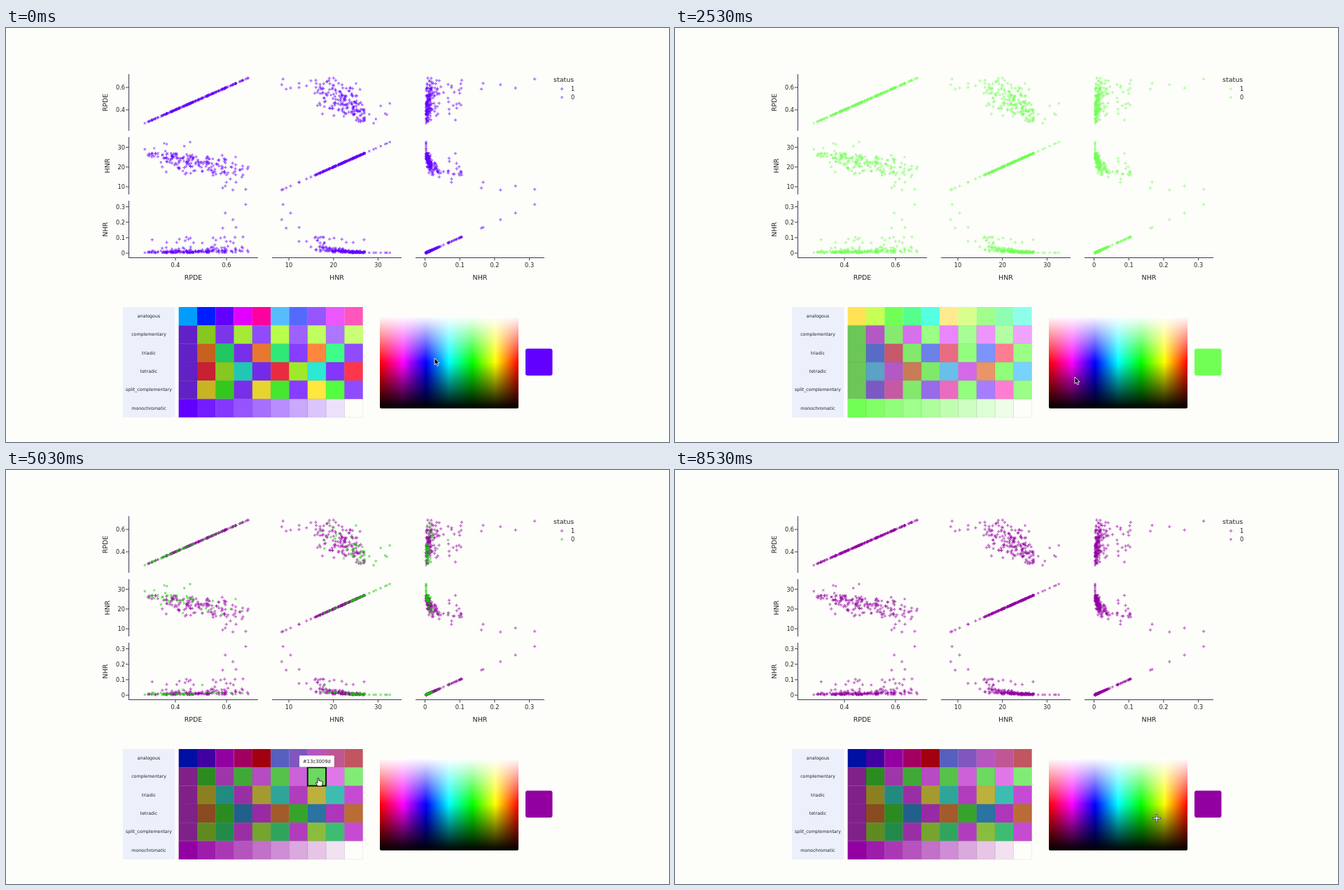
Write an HTML page that moves like this. It is 947 px wide and 592 px high and loops after 8.56 s.

```html
<!DOCTYPE html>
<html lang="en">
<head>
<meta charset="utf-8">
<title>Scatter matrix with colour harmonies</title>
<style>
  html, body { margin: 0; width: 100%; height: 100%; overflow: hidden; background: #fdfdfa; }
  #stage { position: relative; width: 947px; height: 592px; }
  #picker {
    position: absolute; left: 533.5px; top: 411.5px; width: 198px; height: 132.5px; border-radius: 2px;
    background: linear-gradient(#fff, #fff0 50%, #0000 50%, #000),
      linear-gradient(90deg, red, #f0f, blue, cyan, lime, yellow, red);
  }
  svg { position: absolute; left: 0; top: 0; font-family: "DejaVu Sans", Verdana, sans-serif; fill: #222; }
</style>
</head>
<body>
<div id="stage">
  <div id="picker"></div>
  <svg id="svg" width="947" height="592" viewBox="0 0 947 592"></svg>
</div>
<script>
const LOOP = 8560;
const svg = document.getElementById('svg');

function add(tag, attrs, parent = svg, text) {
  const el = document.createElementNS('http://www.w3.org/2000/svg', tag);
  for (const key in attrs) el.setAttribute(key, attrs[key]);
  if (text !== undefined) el.textContent = text;
  parent.append(el);
  return el;
}
const label = (text, x, y, size, anchor = 'middle', extra = {}) =>
  add('text', { x, y, 'font-size': size, 'text-anchor': anchor, ...extra }, svg, text);
const line = d => add('path', { d, stroke: '#3c3c58', 'stroke-width': 1, fill: 'none' });
const clamp = (v, lo, hi) => Math.max(lo, Math.min(hi, v));

// Seeded random numbers
let seed = 20;
function rand() {
  seed = (seed + 0x6D2B79F5) | 0;
  let n = Math.imul(seed ^ (seed >>> 15), 1 | seed);
  n = (n + Math.imul(n ^ (n >>> 7), 61 | n)) ^ n;
  return ((n ^ (n >>> 14)) >>> 0) / 4294967296;
}
const between = (lo, hi) => lo + (hi - lo) * rand();
const gauss = () => (rand() + rand() + rand() + rand() - 2) * 1.73;

// One sample: [RPDE, HNR, NHR, status]
function sample(i) {
  const status = i % 4 ? 1 : 0;
  if (i % 24 === 0) return [between(.26, .46), between(27.5, 33), .003, status];
  let rpde;
  do rpde = status ? .52 + gauss() * .11 : .45 + gauss() * .09; while (rpde < .29 || rpde > .685);
  const noisy = i % 14 === 5;
  let hnr = 25.3 - (rpde - .35) * 22 + gauss() * 2.8 + (status ? 0 : 1.6) - (noisy ? 3 : 0);
  if (hnr > 27) hnr = between(24.5, 27);
  if (hnr < 12) hnr = between(12, 15);
  return [rpde, hnr, noisy ? between(.06, .115) : .85 * Math.exp(-hnr / 5.2 + gauss() * .4), status];
}
const samples = [[.675, 8.7, .315, 1], [.595, 10.4, .26, 1], [.625, 8.4, .217, 1], [.637, 12.3, .167, 1],
  [.585, 9.4, .162, 1]];
for (let i = 1; i <= 190; i++) samples.push(sample(i));

// Each variable: value -> x and y, ticks, axis ends
const vars = [
  { name: 'RPDE', x: v => 242 + (v - .4) * 365, y: v => 117 - (v - .4) * 160,
    ticks: [.4, .6], xs: [175, 360], ys: [66, 147], titleX: 145 },
  { name: 'HNR', x: v => 404 + (v - 10) * 6.37, y: v => 227 - (v - 10) * 2.82,
    ticks: [10, 20, 30], xs: [380, 565], ys: [156, 238], titleX: 148 },
  { name: 'NHR', x: v => 598.5 + v * 497, y: v => 322 - v * 221,
    ticks: [0, .1, .2, .3], xs: [585, 769], ys: [247, 329], titleX: 145 }
];
for (const v of vars) {
  const midX = (v.xs[0] + v.xs[1]) / 2, midY = (v.ys[0] + v.ys[1]) / 2;
  line(`M${v.xs[0]} 328.5H${v.xs[1]}M175.5 ${v.ys[0]}V${v.ys[1]}`);
  label(v.name, midX, 359.5, 9.5);
  label(v.name, 0, 0, 9.5, 'middle', { transform: `translate(${v.titleX} ${midY})rotate(-90)` });
  for (const tick of v.ticks) {
    line(`M${v.x(tick)} 329v3.5M175 ${v.y(tick)}h-4`);
    label(tick, v.x(tick), 342, 8.2);
    label(tick, 170, v.y(tick) + 3, 8.2, 'end');
  }
}

// Markers: group 1 plus signs, group 0 crosses
const shapes = ['m-1.4 -1.4l2.8 2.8m0 -2.8l-2.8 2.8', 'm-2.2 0h4.4m-2.2 -2.2v4.4'];
const groups = [1, 0].map(() => add('g', { 'stroke-width': 1.25, 'stroke-opacity': .58, fill: 'none' })).reverse();
const marker = (x, y, status) =>
  add('path', { d: `M${x.toFixed(1)} ${y.toFixed(1)}${shapes[status]}` }, groups[status]);
for (const s of samples)
  vars.forEach((h, i) => vars.forEach((v, j) => marker(h.x(s[i]), v.y(s[j]), s[3])));

label('status', 782, 77, 9.5, 'start');
[1, 0].forEach((status, i) => {
  marker(794, 87 + i * 12.2, status);
  label(status, 807, 90 + i * 12.2, 8.2, 'start');
});

// Harmony table
const SIZE = 26.3, LEFT = 246.7, TOP = 399;
const harmonies = ['analogous', 'complementary', 'triadic', 'tetradic', 'split_complementary', 'monochromatic'];
const turns = [null, [0, 180], [0, 120, 240], [0, 90, 180, 270], [0, 150, 210]];
add('rect', { x: 167, y: TOP, width: 74.5, height: SIZE * 6, fill: '#ebf0fb' });
const cells = harmonies.map((name, row) => {
  label(name, 204, TOP + (row + .5) * SIZE + 2, 6.3);
  return Array.from({ length: 10 }, (_, col) => add('rect', {
    x: LEFT + col * SIZE, y: TOP + row * SIZE, width: SIZE, height: SIZE,
    stroke: '#000', 'stroke-opacity': row ? .08 : 0, 'stroke-width': .7
  }));
});

function rgb(h, s, v) {
  return [5, 3, 1].map(n => {
    const k = (n + h / 60 + 6) % 6;
    return Math.round(255 * (v - v * s * clamp(Math.min(k, 4 - k), 0, 1)));
  });
}
const hex = parts => '#' + parts.map(p => p.toString(16).padStart(2, '0')).join('');

function cellColor([h, s, v], row, col) {
  if (row === 0) return { color: rgb(h + (col % 5 - 2) * 30, s, v), alpha: col < 5 ? 1 : .66 };
  if (row === 5) return { color: rgb(h, s, v), alpha: 1 - col / 9 };
  const turn = turns[row], step = Math.floor(col / turn.length);
  return {
    color: rgb(h + turn[col % turn.length], s, Math.min(1, v * (.75 + .15 * step))),
    alpha: .87 - .17 * step / turn.length
  };
}

// Pointer way points: time, x, y
const path = [
  [-150, 587, 478], [0, 612, 472], [700, 671, 456], [1200, 671, 456], [1470, 671, 448], [1830, 671, 456],
  [2530, 571, 499], [2900, 570, 502], [3600, 478, 467], [4300, 446, 440], [5030, 446, 440],
  [7000, 443, 508], [7600, 443, 510], [8200, 712, 520], [8530, 688, 498], [LOOP, 688, 498]
];
function pointerAt(t) {
  const i = path.findIndex(p => p[0] > t);
  const [t0, x0, y0] = path[i - 1], [t1, x1, y1] = path[i], u = (t - t0) / (t1 - t0);
  return [x0 + (x1 - x0) * u, y0 + (y1 - y0) * u];
}

// While dragging, the colour under the pointer is taken at a fixed beat, a little late
const DRAG_END = 2900, BEAT = 660, LAG = 150;
function baseAt(t) {
  const [x, y] = pointerAt(Math.min(Math.floor(t / BEAT) * BEAT - LAG, DRAG_END));
  const l = (544 - y) / 132, v = l + Math.min(l, 1 - l);
  return [360 * (1 - (x - 534) / 197), 2 * (1 - l / v), v];
}

function cellAt(t) {
  const [x, y] = pointerAt(t);
  const row = Math.floor((y - TOP) / SIZE), col = Math.floor((x - LEFT) / SIZE);
  return cells[row]?.[col] ? [row, col] : null;
}
const hoverAt = t => t > DRAG_END ? cellAt(t - 100) : null;

// A cell is clicked at even intervals, then the choice is cleared
const FIRST_CLICK = 4900, CLICK_GAP = 700;
function pickAt(t) {
  const k = Math.floor((t - FIRST_CLICK) / CLICK_GAP);
  return k >= 0 && k < 4 ? cellAt(FIRST_CLICK + k * CLICK_GAP) : null;
}

const swatch = add('rect', { x: 742, y: 458.5, width: 38.5, height: 38.5, rx: 3 });
const frame = add('rect', { width: SIZE, height: SIZE, fill: 'none', stroke: '#111', 'stroke-width': 2 });
const tip = add('g', {});
add('rect', { x: -25, y: -8.3, width: 50, height: 16.6, rx: 1, fill: '#fcfcfc', stroke: '#0002', 'stroke-width': .6 }, tip);
const tipText = add('text', { y: 2.4, 'font-size': 6.8, 'text-anchor': 'middle' }, tip, '');

const pointer = add('g', { 'stroke-linejoin': 'round' });
const [arrow, hand, cross] = [
  { d: 'M0 0V9.6L2.2 7.6L3.9 11.2L5.6 10.4L4 7H7Z', fill: '#000', stroke: '#fff' },
  { d: 'M-1 1Q0 -.6 1 1V4.4Q2.2 3.6 3 4.7Q4.2 4.1 4.8 5.2Q6.2 5 6.2 6.5V9L5 12H-.6L-3.6 7.6Q-3.4 6 -1 7.6Z',
    fill: '#fff', stroke: '#000' },
  { d: 'M-1 -5.5H1V-1H5.5V1H1V5.5H-1V1H-5.5V-1H-1Z', fill: '#fff', stroke: '#335' }
].map(shape => add('path', { ...shape, 'stroke-width': .85 }, pointer));

const set = (el, key, value) => el.setAttribute(key, value);
const show = (el, on) => set(el, 'visibility', on ? 'visible' : 'hidden');

let shown;
function paint(base) {
  const main = hex(rgb(...base));
  if (shown === main) return;
  shown = main;
  set(swatch, 'fill', main);
  set(groups[1], 'stroke', main);
  cells.forEach((list, row) => list.forEach((cell, col) => {
    const { color, alpha } = cellColor(base, row, col);
    set(cell, 'fill', hex(color));
    set(cell, 'fill-opacity', alpha);
  }));
}

function draw(t) {
  const base = baseAt(t), pick = pickAt(t), hover = hoverAt(t), [x, y] = pointerAt(t);
  paint(base);

  set(groups[0], 'stroke', pick ? hex(cellColor(base, ...pick).color) : shown);
  show(frame, pick);
  if (pick) {
    set(frame, 'x', LEFT + pick[1] * SIZE);
    set(frame, 'y', TOP + pick[0] * SIZE);
  }

  show(tip, hover);
  if (hover) {
    const { color, alpha } = cellColor(base, ...hover);
    set(tip, 'transform', `translate(${LEFT + (hover[1] + .5) * SIZE} ${TOP + (hover[0] + .5) * SIZE - 22})`);
    tipText.textContent = hex([...color, Math.round(alpha * 255)]);
  }

  const overPicker = x >= 534 && x <= 731 && t > DRAG_END;
  const cursor = overPicker ? cross : t > DRAG_END && cellAt(t) ? hand : arrow;
  for (const c of [arrow, hand, cross]) show(c, c === cursor);
  set(pointer, 'transform', `translate(${x} ${y})`);
}

const start = performance.now();
function tick() {
  draw((performance.now() - start) % LOOP);
  requestAnimationFrame(tick);
}
tick();
</script>
</body>
</html>
```
